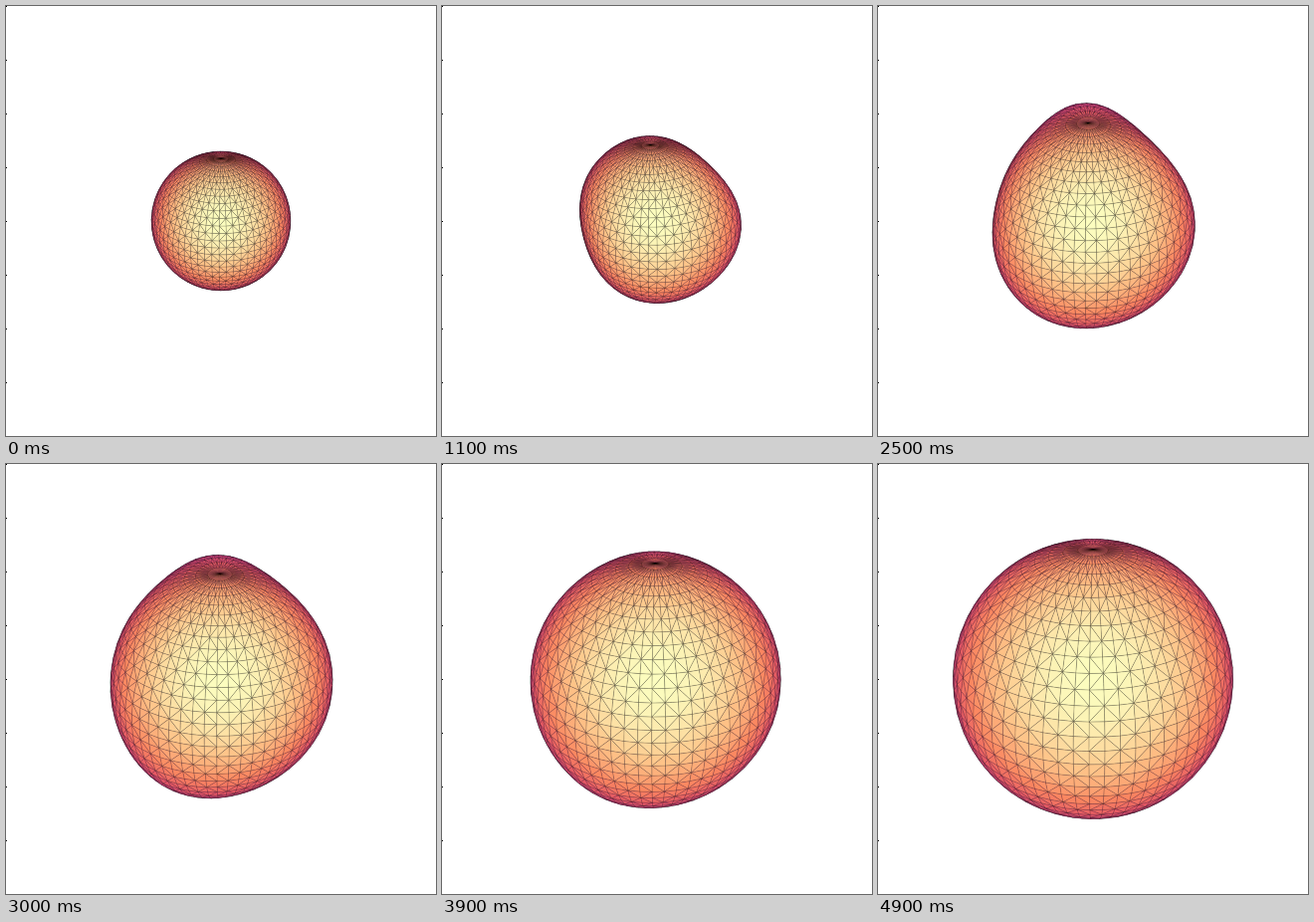
Recreate the animation shown at these times as an HTML page with a canvas. Size 432x432 px, loop 5.5 s.

```html
<!DOCTYPE html>
<html lang="en">
<head>
<meta charset="utf-8">
<title>Growing sphere mesh</title>
<style>
html, body { margin: 0; width: 100%; height: 100%; overflow: hidden; background: #fff; }
canvas { display: block; width: 432px; height: 432px; }
</style>
</head>
<body>
<canvas id="view" width="432" height="432"></canvas>
<script>
const ctx = document.getElementById("view").getContext("2d");
const SIZE = 432, MID = SIZE / 2;
const STEP = 100, LAST = 49, LOOP = 5500;
const ROWS = 31, COLS = 63, TILT = Math.PI / 6;
const DIST = 3.5, FOCAL = MID / Math.tan(rad(12.5));
const SMALL = 69.8, LARGE = 140.6;

// Swellings and dents on the rim: each comes and goes around its peak step.
const bumps = [
  { angle: 165, height: -17, width: 40, peak: 10, spread: 7 },
  { angle: 5, height: 8, width: 28, peak: 15, spread: 9 },
  { angle: 268, height: 15, width: 17, peak: 26, spread: 10 },
  { angle: 318, height: -9, width: 22, peak: 18, spread: 10 },
  { angle: 195, height: -12, width: 32, peak: 25, spread: 5 },
  { angle: 112, height: 11, width: 26, peak: 33, spread: 7 },
  { angle: 200, height: -6, width: 50, peak: 44, spread: 4 }
];

const magma = [
  [0, 0, 4], [28, 16, 68], [81, 18, 124], [130, 37, 129], [183, 55, 121],
  [229, 89, 100], [251, 136, 97], [254, 194, 135], [252, 253, 191]
];

function rad(deg) { return deg * Math.PI / 180; }
const mix = (a, b, k) => a + (b - a) * k;

function shade(v) {
  const p = v * (magma.length - 1);
  const i = Math.min(magma.length - 2, Math.floor(p));
  return `rgb(${magma[i].map((c, n) => Math.round(mix(c, magma[i + 1][n], p - i)))})`;
}

const dirs = [], faces = [];
for (let i = 0; i <= ROWS; i++) {
  for (let j = 0; j < COLS; j++) {
    const lat = Math.PI * i / ROWS;
    const lon = Math.PI / 2 + 2 * Math.PI * (j + 0.25) / COLS;
    const y = Math.cos(lat), z = Math.sin(lat) * Math.sin(lon);
    dirs.push({
      x: Math.sin(lat) * Math.cos(lon),
      y: y * Math.cos(TILT) - z * Math.sin(TILT),
      z: y * Math.sin(TILT) + z * Math.cos(TILT)
    });
    if (i === ROWS) continue;
    const a = i * COLS + j, b = i * COLS + (j + 1) % COLS, c = a + COLS, d = b + COLS;
    if (i === 0) faces.push([a, d, c]);
    else if (i === ROWS - 1) faces.push([a, b, c]);
    else if ((i + j) % 2) faces.push([a, b, c], [b, d, c]);
    else faces.push([a, b, d], [a, d, c]);
  }
}

function poseAt(n) {
  const fade = Math.min(1, 2 * Math.sin(Math.PI * n / LAST));
  return {
    x: MID - 4.5 * fade * (1 - Math.cos(2 * Math.PI * n / 34)),
    radius: mix(SMALL, LARGE, n / LAST),
    bumps: bumps.map(b => ({
      x: Math.cos(rad(b.angle)),
      y: -Math.sin(rad(b.angle)),
      tight: 1 / rad(b.width) ** 2,
      height: b.height * fade * Math.exp(-(((n - b.peak) / b.spread) ** 2))
    }))
  };
}

function project(p, pose) {
  let px = pose.radius;
  for (const b of pose.bumps) {
    px += b.height * Math.exp((p.x * b.x + p.y * b.y - 1) * b.tight);
  }
  const size = DIST * px / Math.hypot(FOCAL, px);
  const near = 1 / (DIST - size * p.z);
  return {
    x: pose.x + FOCAL * size * p.x * near,
    y: MID - FOCAL * size * p.y * near,
    near
  };
}

function draw(n) {
  const pose = poseAt(n);
  const pts = dirs.map(p => project(p, pose));
  const tris = faces.map(f => {
    const t = f.map(i => pts[i]);
    return { t, near: (t[0].near + t[1].near + t[2].near) / 3 };
  }).sort((a, b) => a.near - b.near);
  const low = tris[0].near, span = tris[tris.length - 1].near - low;

  ctx.fillStyle = "#fff";
  ctx.fillRect(0, 0, SIZE, SIZE);
  ctx.fillStyle = "#000";
  for (let y = 0; y < SIZE; y += 54) ctx.fillRect(0, y, 1, 1);

  ctx.lineWidth = 0.15;
  ctx.lineJoin = "round";
  ctx.strokeStyle = "#000";
  for (const { t, near } of tris) {
    ctx.fillStyle = shade((near - low) / span);
    ctx.beginPath();
    for (const p of t) ctx.lineTo(p.x, p.y);
    ctx.closePath();
    ctx.fill();
    ctx.stroke();
  }
}

let shown = -1;
const start = performance.now();
function tick() {
  const time = (performance.now() - start) % LOOP;
  const n = Math.min(LAST, Math.floor(time / STEP));
  if (n !== shown) draw(shown = n);
  requestAnimationFrame(tick);
}
tick();
</script>
</body>
</html>
```
